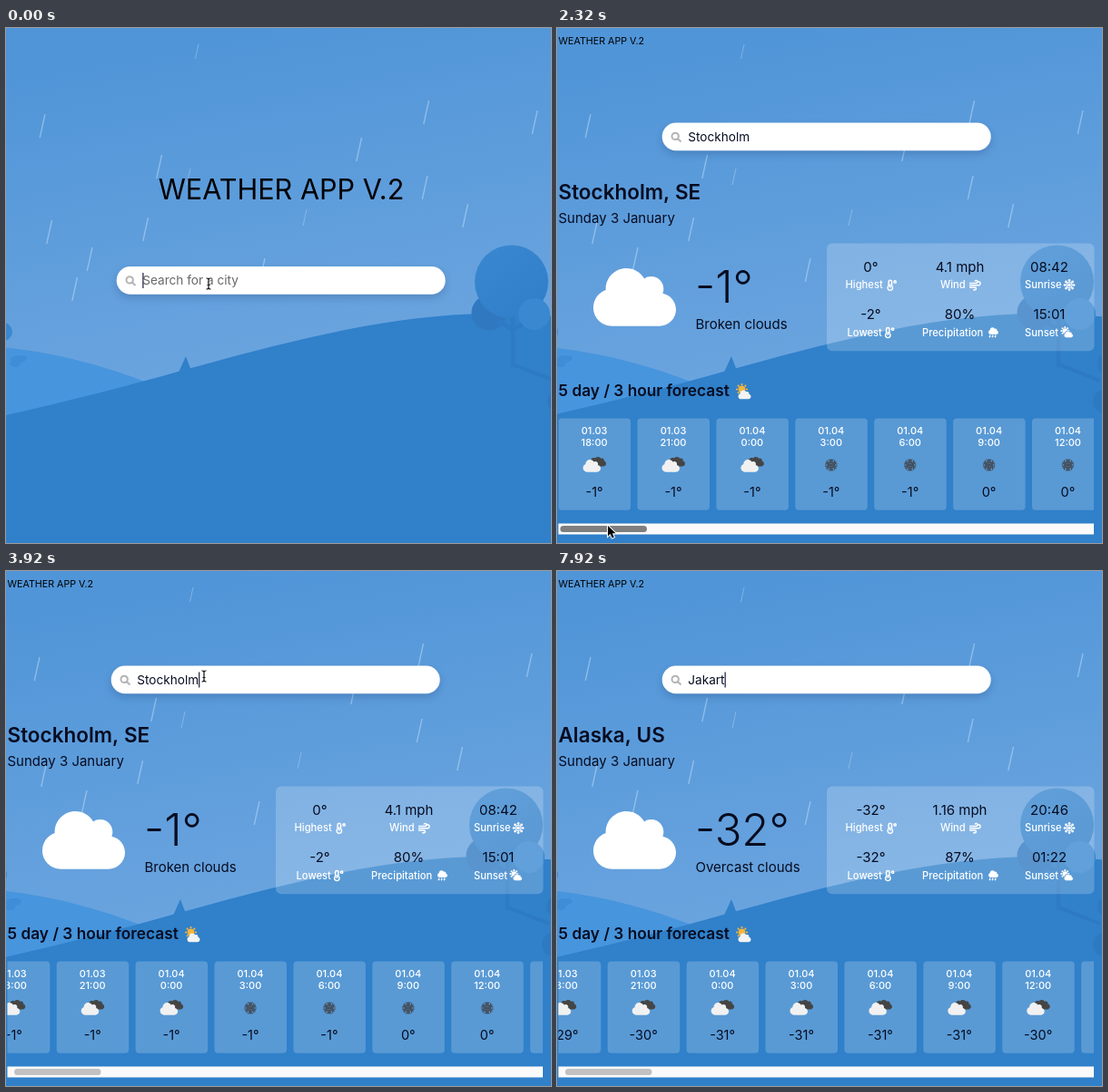
Recreate the animation shown at these times as an HTML page with a canvas. Size 600 by 568 pixels, loop 8 s.

```html
<!DOCTYPE html>
<html lang="en">
<head>
<meta charset="utf-8">
<title>Weather app</title>
<style>
  html, body { margin: 0; width: 100%; height: 100%; overflow: hidden; background: #3080ca; }
  canvas { display: block; width: 600px; height: 568px; }
</style>
</head>
<body>
<canvas id="stage" width="600" height="568"></canvas>
<script>
const ctx = document.getElementById('stage').getContext('2d');
const LOOP = 8000, SUBMIT = 1440, RESULT = 2040, SECOND_RESULT = 6400;
const INK = '#070c20', WHITE = '#fff';

const CLOUD = new Path2D('M537.6 226.6c4.1-10.7 6.4-22.4 6.4-34.6 0-53-43-96-96-96-19.7 0-38.1 6-53.3 16.2C367 64.2 315.3 32 256 32c-88.4 0-160 71.6-160 160 0 2.7.1 5.4.2 8.1C40.2 219.8 0 273.2 0 336c0 79.5 64.5 144 144 144h368c70.7 0 128-57.3 128-128 0-61.9-44-113.6-102.4-125.4z');
const HILL = new Path2D('M-10 428C60 412 120 397 185 378.5C300 347 400 320 505 315.5Q560 314 620 320V570H-10Z');
const LEFT_HILL = new Path2D('M-10 352C50 358 100 372 150 391L-10 432Z');
const ARROW = new Path2D('M0 0V11.5L2.7 9L4.6 13.4L6.8 12.4L4.9 8.2H8.6Z');

// Upper end and length of each streak
const RAIN = [[206, 18, 16], [37, 95, 26], [459.5, 80, 26], [579, 91, 26], [385.5, 121, 26],
  [165.5, 140, 26], [197, 155, 18], [458, 163, 26], [325, 200, 18], [502.5, 194, 26],
  [150.5, 209, 26], [44.5, 212, 26], [89, 242, 26], [72.5, 275, 26], [279, 254, 26]];

const CITIES = [
  { name: 'Stockholm, SE', temp: '-1°', sky: 'Broken clouds',
    details: ['0°', '4.1 mph', '08:42', '-2°', '80%', '15:01'],
    degrees: i => i > 4 && i < 8 ? 0 : -1, snow: i => i > 2 },
  { name: 'Alaska, US', temp: '-32°', sky: 'Overcast clouds',
    details: ['-32°', '1.16 mph', '20:46', '-32°', '87%', '01:22'],
    degrees: i => i === 0 ? -29 : i > 1 && i < 6 ? -31 : -30, snow: () => false },
];

// Keystrokes: start, time per key, word, erasing
const KEYS = [[320, 95, 'Stockholm'], [4240, 90, 'Stockholm', true], [5190, 160, 'Alaska'],
  [6640, 80, 'Alaska', true], [7100, 160, 'Jakarta']];

const THUMB = [[2400, 0], [3280, 73], [3400, 73], [3640, 5.5]];
const POINTER_X = [[SUBMIT, 223], [1840, 163], [2240, 56], [2400, 56], [3280, 126], [3400, 126], [3640, 60], [3880, 218]];
const POINTER_Y = [[SUBMIT, 282], [1840, 489], [2240, 549], [2400, 549], [3280, 538], [3400, 538], [3640, 547], [3880, 116]];

const clamp = v => Math.min(1, Math.max(0, v));

function track(keys, t) {
  const next = keys.findIndex(k => k[0] > t);
  if (next < 0) return keys[keys.length - 1][1];
  if (next === 0) return keys[0][1];
  const [t0, a] = keys[next - 1], [t1, b] = keys[next];
  const p = (t - t0) / (t1 - t0);
  return a + (b - a) * p * p * (3 - 2 * p);
}

function text(str, x, y, size, { weight = 400, color = INK, align = 'left' } = {}) {
  ctx.font = `${weight} ${size}px Inter, sans-serif`;
  ctx.fillStyle = color;
  ctx.textAlign = align;
  ctx.fillText(str, x, y);
}

function disc(x, y, r, fill) {
  ctx.fillStyle = fill;
  ctx.beginPath();
  ctx.arc(x, y, r, 0, 7);
  ctx.fill();
}

function box(x, y, w, h, r, fill) {
  ctx.fillStyle = fill;
  ctx.beginPath();
  ctx.roundRect(x, y, w, h, r);
  ctx.fill();
}

function stroke(path, color, width) {
  ctx.strokeStyle = color;
  ctx.lineWidth = width;
  ctx.stroke(new Path2D(path));
}

function at(x, y, draw) {
  ctx.save();
  ctx.translate(x, y);
  draw();
  ctx.restore();
}

function cloud(x, y, w, fill) {
  at(x, y, () => {
    ctx.scale(w / 640, w / 640);
    ctx.translate(0, -32);
    ctx.fillStyle = fill;
    ctx.fill(CLOUD);
  });
}

function sun(x, y, r, color, ray = 0.28) {
  disc(x, y, r, color);
  for (let i = 0; i < 8; i++) {
    const a = i * Math.PI / 4;
    disc(x + Math.cos(a) * r * 1.4, y + Math.sin(a) * r * 1.4, r * ray, color);
  }
}

function snowflake(x, y) {
  at(x, y, () => {
    for (let i = 0; i < 6; i++) {
      stroke('M0 0V-6.8M-2.6-6.2L0-4L2.6-6.2M-2-3.8L0-2L2-3.8', '#434d59', 1.2);
      ctx.rotate(Math.PI / 3);
    }
  });
}

// Detail icons, drawn around their centre
function thermometer() {
  stroke('M-3.4 1V-3.6A1.7 1.7 0 0 1 0-3.6V1A2.7 2.7 0 1 1-3.4 1Z', WHITE, 1.5);
  stroke('M-1.7-1V3', WHITE, 1.5);
  stroke('M4.8-3.6A1.2 1.2 0 1 1 2.4-3.6A1.2 1.2 0 1 1 4.8-3.6', WHITE, 1.4);
}
function wind() {
  stroke('M-6-2H1.5A1.5 1.5 0 1 0 0-4M-6 .2H4A2 2 0 1 0 2.5-3M-6 2.4H0A1.5 1.5 0 1 1-1.5 4.4', WHITE, 1.5);
}
function brightSun() {
  sun(0, 0, 3.6, WHITE, 0.38);
  disc(0, 0, 2.5, '#76a9dc');
  disc(0, 0, 1.8, WHITE);
}
function rainCloud() {
  cloud(-5.5, -5.5, 11, WHITE);
  stroke('M-3.5 3L-4.3 5.5M-.5 3L-1.3 5.5M2.5 3L1.7 5.5', WHITE, 1.4);
}
function cloudSun() {
  sun(-2.2, -1.8, 2.8, WHITE, 0.38);
  cloud(-4, -2, 11, '#6ea4da');
  cloud(-3, -1.2, 9.5, WHITE);
}

// Label, column centre, label start, icon centre, icon
const DETAILS = [
  ['Highest', 345.5, 317.5, 368.5, thermometer], ['Wind', 443.5, 422, 460, wind],
  ['Sunrise', 542, 515, 564, brightSun], ['Lowest', 345.5, 319.5, 366, thermometer],
  ['Precipitation', 443.5, 402, 480.5, rainCloud], ['Sunset', 542, 515, 561.5, cloudSun]];

function landscape() {
  const sky = ctx.createLinearGradient(260, 0, 330, 390);
  sky.addColorStop(0, '#5095d8');
  sky.addColorStop(1, '#6ca5df');
  ctx.fillStyle = sky;
  ctx.fillRect(-10, 0, 620, 568);

  for (const [x, y, len] of RAIN) {
    const faint = len < 20;
    stroke(`M${x} ${y}l${-len * 0.22} ${len}`, `rgba(215,235,255,${faint ? 0.32 : 0.42})`, faint ? 1.1 : 1.4);
  }

  disc(-9, 335, 10, '#3a88d0');
  ctx.fillStyle = '#4795dd';
  ctx.fill(LEFT_HILL);
  ctx.fillStyle = '#3e8dd6';
  ctx.beginPath();
  ctx.ellipse(8, 365, 9, 4, -0.1, 0, 7);
  ctx.ellipse(4, 370, 6, 4, 0, 0, 7);
  ctx.fill();

  ctx.fillStyle = '#3080ca';
  ctx.fill(HILL);
  ctx.fill(new Path2D('M192 362L183 382L198 378Z'));

  stroke('M552 371L598 389', '#2d7ac3', 4);
  disc(607, 370, 12, '#2d7ac3');
  disc(603, 412, 13, '#2d7ac3');
  disc(526, 314, 19.5, '#3079c1');
  const crown = ctx.createLinearGradient(525, 250, 575, 315);
  crown.addColorStop(0, '#3886cf');
  crown.addColorStop(1, '#317fc8');
  disc(550.5, 280, 40.5, crown);
  stroke('M552 374V318M552 333L536 323M552 333L567 324', '#2e7bc4', 4.5);
  disc(575.5, 315.5, 17.5, '#3a88d0');
}

function typed(t) {
  let value = '';
  for (const [start, step, word, erase] of KEYS) {
    if (t < start) break;
    const n = Math.min(word.length, Math.floor((t - start) / step) + 1);
    value = word.slice(0, erase ? word.length - n : n);
  }
  return value;
}

function searchBox(t, y) {
  ctx.save();
  ctx.shadowColor = 'rgba(0,20,60,.17)';
  ctx.shadowBlur = 9;
  ctx.shadowOffsetY = 4;
  box(115.7, y - 15.4, 362, 30.6, 15.3, WHITE);
  ctx.restore();
  at(130.5, y, () => stroke('M3.4-.6A3.7 3.7 0 1 1-4-.6A3.7 3.7 0 1 1 3.4-.6M2.3 2L6 5.4', '#b4b4b4', 2));

  const value = typed(t);
  text(value || 'Search for a city', 144.3, y + 4.7, 13.6, { color: value ? INK : '#686868' });
  const typing = t > 320 && t < 1200 || t > 4240;
  const focused = t < SUBMIT || t > 2400;
  if (focused && (typing || t % 1120 < 600)) {
    const end = 144.3 + (value ? ctx.measureText(value).width : 0);
    ctx.fillStyle = '#1b1b3a';
    ctx.fillRect(end, y - 8.5, 1.2, 17);
  }
}

function forecast(city, offset) {
  ctx.save();
  ctx.beginPath();
  ctx.rect(1.5, 425, 589.5, 112);
  ctx.clip();
  const scroll = offset * 5.96;
  for (let i = 0; i < 16; i++) {
    const x = 1.6 + i * 86.9 - scroll, mid = x + 39.5, hours = 18 + 3 * i;
    box(x, 430.5, 79.5, 101.3, 4, 'rgba(255,255,255,.2)');
    const white = { weight: 500, color: WHITE, align: 'center' };
    text(`01.0${3 + Math.floor(hours / 24)}`, mid, 448, 11, white);
    text(`${hours % 24}:00`, mid, 461, 11, white);
    if (city.snow(i)) {
      snowflake(mid, 482);
    } else {
      cloud(mid - 2, 473, 15, '#454545');
      cloud(mid - 6, 474, 13, '#454545');
      cloud(mid - 12.5, 476, 19.5, '#f1f1f1');
    }
    text(`${city.degrees(i)}°`, mid, 516.5, 14.5, { align: 'center' });
  }
  ctx.restore();
}

function weather(t) {
  const city = CITIES[t < SECOND_RESULT ? 0 : 1];
  const offset = track(THUMB, t);
  text('WEATHER APP V.2', 1.5, 18, 10.7, { color: '#000' });
  text(city.name, 1.5, 188.5, 22.5, { weight: 600 });
  text('Sunday 3 January', 1.5, 215, 15);
  cloud(40, 265, 91, WHITE);
  text(city.temp, 152, 303, 49, { weight: 300 });
  text(city.sky, 152.5, 332, 15);

  box(297, 237.5, 294.5, 118.8, 6, 'rgba(255,255,255,.2)');
  DETAILS.forEach(([label, mid, labelX, iconX, icon], i) => {
    const y = i < 3 ? 269 : 321.3;
    text(city.details[i], mid, y, 15, { align: 'center' });
    text(label, labelX, y + 18.2, 11.2, { weight: 500, color: WHITE });
    at(iconX, y + 14.5, icon);
  });

  text('5 day / 3 hour forecast', 1.5, 406, 17.3, { weight: 600 });
  sun(203.5, 398.5, 3.9, '#f6b53c');
  cloud(199.5, 399.5, 14, '#f3f3f3');

  forecast(city, offset);
  ctx.fillStyle = '#fafafa';
  ctx.fillRect(1.5, 546.5, 589.5, 12);
  const grabbed = t > 2200 && t < 3660;
  box(3.5 + offset, 549, 95.5, 7, 3.5, grabbed ? '#7f7f7f' : '#c1c1c1');
}

function pointer(t) {
  if (t > 320 && t < SUBMIT || t > 4240) return;
  const x = track(POINTER_X, t), y = track(POINTER_Y, t);
  const overInput = t < 1500 || t > 3840;
  at(x, y, () => {
    if (overInput) {
      const beam = 'M-2.5-6Q0-6 0-4.5Q0-6 2.5-6M0-4.5V4.5M-2.5 6Q0 6 0 4.5Q0 6 2.5 6M-1.5 1.5H1.5';
      stroke(beam, 'rgba(255,255,255,.8)', 2.6);
      stroke(beam, '#111', 1.2);
    } else {
      ctx.strokeStyle = WHITE;
      ctx.lineWidth = 2;
      ctx.stroke(ARROW);
      ctx.fillStyle = '#000';
      ctx.fill(ARROW);
    }
  });
}

function render(t) {
  const rise = 1 - (1 - clamp((t - SUBMIT) / 656)) ** 3;
  const shift = t < SUBMIT ? 6 : 0; // the page scrollbar narrows the layout
  at(shift, 0, landscape);
  if (t < SUBMIT) text('WEATHER APP V.2', 303, 188.5, 30.6, { color: '#000', align: 'center' });
  at(shift, 0, () => searchBox(t, 278.5 - 158.5 * rise));
  if (t > RESULT) {
    ctx.globalAlpha = clamp((t - RESULT) / 200);
    weather(t);
    ctx.globalAlpha = 1;
  }
  pointer(t);
}

const start = performance.now();
function tick() {
  render((performance.now() - start) % LOOP);
  requestAnimationFrame(tick);
}
tick();
</script>
</body>
</html>
```
